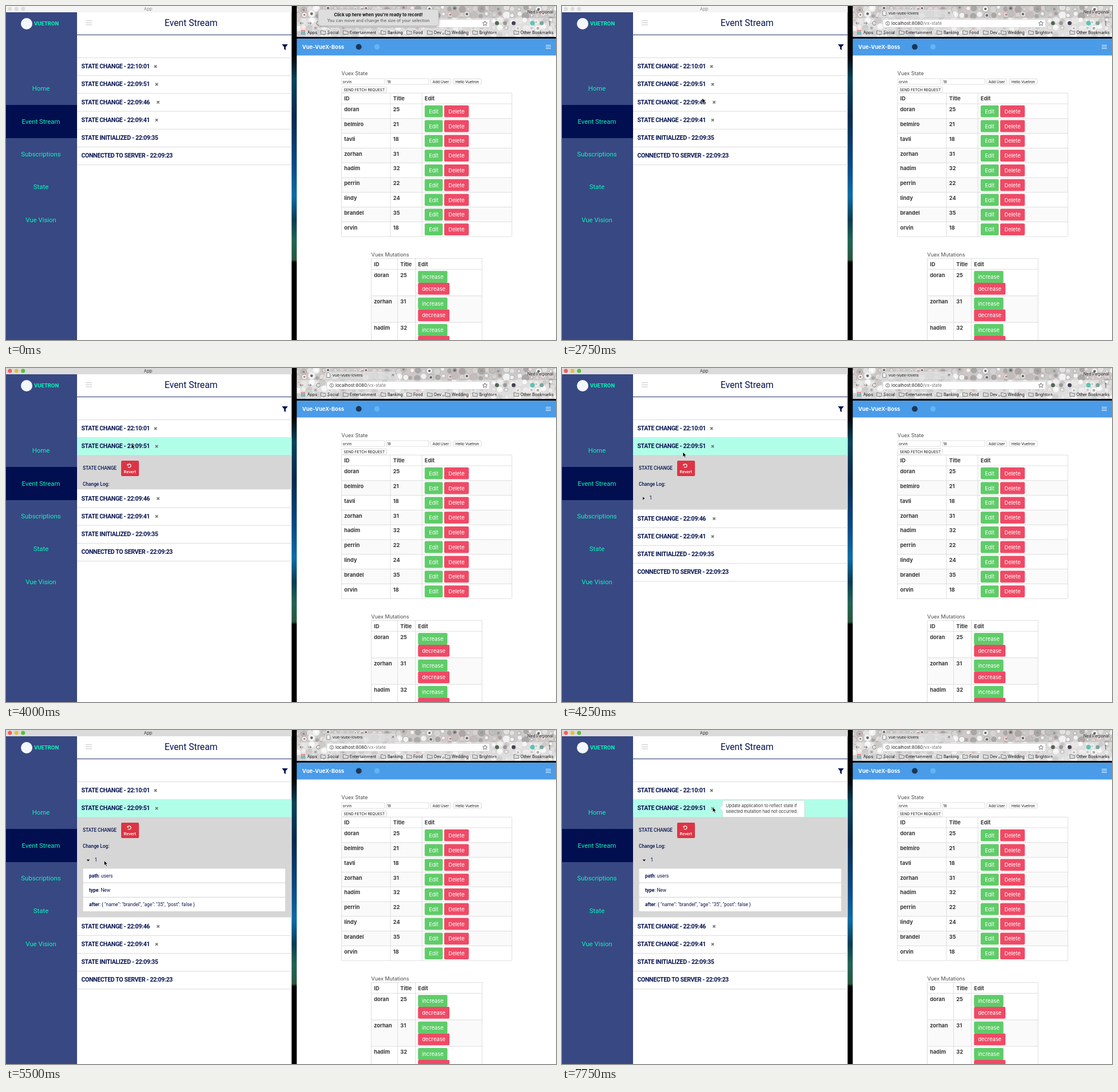
Recreate the animation shown at these times as an HTML page. Size 960 by 584 pixels, loop 8000 ms.

```html
<!DOCTYPE html>
<html lang="en">
<head>
<meta charset="utf-8">
<title>Event Stream</title>
<style>
  html, body { margin: 0; width: 100%; height: 100%; overflow: hidden; background: #fff; }
  #stage { display: block; width: 960px; height: 584px; }
  text { font-family: Inter, "Liberation Sans", sans-serif; white-space: pre; }
  .app text { font-family: Roboto, "Open Sans", sans-serif; }
  .app .event { letter-spacing: -.33px; }
</style>
</head>
<body>
<svg id="stage" viewBox="0 0 960 584"></svg>
<script>
const NAVY = '#06134f', TEAL = '#0cf5b8', GREEN = '#5fcc69', RED = '#ef4a66', LINE = '#dbdbdb';
const LOOP = 8000, STEP = 250;
const APP_WIDTH = 498.5;
const stage = document.getElementById('stage');

const box = (x, y, w, h, fill, extra = '') =>
  `<rect x="${x}" y="${y}" width="${w}" height="${h}" fill="${fill}" ${extra}/>`;
const dot = (x, y, r, fill, extra = '') =>
  `<circle cx="${x}" cy="${y}" r="${r}" fill="${fill}" ${extra}/>`;
const path = (d, fill, extra = '') => `<path d="${d}" fill="${fill}" ${extra}/>`;
const stroke = (d, color, width = 1) => path(d, 'none', `stroke="${color}" stroke-width="${width}"`);
// y is the middle of the capital letters
const text = (s, x, y, size, fill, weight = 400, extra = '') =>
  `<text x="${x}" y="${y + size * .36}" font-size="${size}" fill="${fill}" font-weight="${weight}" ${extra}>${s}</text>`;
const centered = (s, x, y, size, fill, weight) => text(s, x, y, size, fill, weight, 'text-anchor="middle"');
const burger = (x, y, w, gap, color) =>
  stroke([-1, 0, 1].map(i => `M${x} ${y + i * gap}h${w}`).join(''), color, 1.2);
const cross = (x, y, r, color, width) =>
  stroke(`M${x - r} ${y - r}l${2 * r} ${2 * r}m0 ${-2 * r}l${-2 * r} ${2 * r}`, color, width);

function sidebar() {
  const items = ['Home', 'Event Stream', 'Subscriptions', 'State', 'Vue Vision'];
  return box(0, 11, 124, 573, '#384883') + box(0, 173, 124, 58, '#010f50') +
    dot(36, 31, 10, '#f4f7fb') + text('VUETRON', 49, 31, 9.5, TEAL, 700) +
    items.map((s, i) => centered(s, 61, 144.3 + i * 57.3, 11.4, TEAL)).join('');
}

function eventRow(label, i, crossX) {
  const top = 90.5 + i * 31.2;
  return text(label, 131.5, top + 15, 10.5, NAVY, 600, 'class="event"') +
    (crossX ? cross(crossX, top + 15.3, 2.1, '#777', 1.7) : '') +
    stroke(`M124 ${top + 31.2}H${APP_WIDTH}`, LINE);
}

function detailPanel() {
  const entries = [['path', 'users'], ['type', 'New'],
    ['after', '{ "name": "brandel", "age": "35", "post": false }']];
  const list = entries.map(([key, value], i) =>
    box(134.5, 242.3 + i * 25.2, 353, 24.4, '#fff') +
    text(`<tspan font-weight="700">${key}</tspan>: ${value}`, 145, 254.6 + i * 25.2, 8.4, NAVY)).join('');
  return `<svg id="panel" x="124" y="152.3" width="${APP_WIDTH - 124}" height="0">
    ${box(124, 152, 375, 180, '#d6d6d6')}
    ${text('STATE CHANGE', 134, 175, 8.4, NAVY, 500, 'letter-spacing="-.1"')}
    ${box(201, 162, 31, 27, '#dc3545', 'rx="2"')}
    ${stroke('M212.6 169.2a3 3 0 1 1 .3 3.8', '#fff', 1.2)}
    ${path('M211.4 167.4v3.2h3.2z', '#fff')}
    ${centered('Revert', 216.3, 181.3, 7.4, '#fff', 500)}
    ${text('Change Log:', 134, 203.3, 8.3, NAVY, 500)}
    <g id="closed">${path('M141 225.6l3.4 2.4-3.4 2.4z', '#111')}${text('1', 152.6, 227, 8.6, NAVY)}</g>
    <g id="opened">${path('M140.6 226.6h5.6l-2.8 3z', '#111')}${text('1', 154.6, 227, 8.6, NAVY)}</g>
    <svg id="list" x="134" y="242" width="354" height="0">${box(134, 242, 354, 75.5, '#c6c6c6')}${list}</svg>
  </svg>`;
}

function appWindow() {
  const lights = ['#fc5b57', '#e5bf3c', '#57c038'];
  const titleBar = (id, fill, color, dots) => `<g id="${id}">${box(0, 0, APP_WIDTH, 11, fill)}
    ${dots.map((c, i) => dot(6.8 + i * 11.5, 5, 3.5, c)).join('')}${centered('App', 248, 5.3, 7.5, color)}</g>`;
  return `<g class="app">${box(0, 0, APP_WIDTH, 584, '#fff')}${sidebar()}
    ${burger(139, 29.3, 11, 3.6, '#cfcfcf')}${centered('Event Stream', 323, 29.5, 15.7, NAVY)}
    ${stroke(`M124 50.5H${APP_WIDTH}`, '#28356f')}${stroke(`M124 90.5H${APP_WIDTH}`, LINE)}
    ${path('M481.6 67h10.4l-3.8 4.8v5.4l-2.8-2v-3.4z', NAVY)}
    ${eventRow('STATE CHANGE - 22:10:01', 0, 261)}
    ${box(124, 121.7, APP_WIDTH - 124, 30.8, '#b1fee8', 'id="highlight"')}
    ${eventRow('STATE CHANGE - 22:09:51', 1, 263)}
    ${detailPanel()}
    <g id="below">${eventRow('STATE CHANGE - 22:09:46', 2, 265.5)}${eventRow('STATE CHANGE - 22:09:41', 3, 263)}
    ${eventRow('STATE INITIALIZED - 22:09:35', 4)}${eventRow('CONNECTED TO SERVER - 22:09:23', 5)}</g></g>
    ${titleBar('inactive', '#f5f5f5', '#888', Array(3).fill('#dcdcdc'))}
    ${titleBar('active', '#dcdbdc', '#333', lights)}`;
}

function themePattern() {
  let seed = 7;
  const random = () => (seed = seed * 16807 % 2147483647) / 2147483647;
  const pick = list => list[Math.floor(random() * list.length)];
  let out = box(507, 0, 453, 57, '#cbc9c8');
  for (let x = 507; x < 966; x += 11) for (let y = 2; y < 58; y += 11) {
    const cx = (x + random() * 5).toFixed(1), cy = (y + random() * 5).toFixed(1), r = 3 + random() * 3.5;
    out += dot(cx, cy, r.toFixed(1), pick(['#f2f2f2', '#e3e1e0', '#d6d4d3', '#c0bebd', '#aaa8a7']),
      `stroke="${pick(['#b5b5b5', '#eee', '#c9a5a2', '#999'])}" stroke-width=".7"`);
    if (random() < .3) out += dot(cx, cy, (r * .4).toFixed(1), pick(['#666', '#b08080', '#999', '#fff']));
  }
  return out;
}

function browserBar() {
  const bookmarks = [['Social', 561], ['Entertainment', 600], ['Banking', 666], ['Food', 711],
    ['Dev', 747], ['Wedding', 778], ['Brightorn', 826], ['Other Bookmarks', 898]];
  const folder = x => path(`M${x} 43h3l1 1.2h4.5v5.3h-8.5z`, '#ddd', 'stroke="#666" stroke-width=".8"');
  const grid = [0, 1, 2].map(i => ['#e2574c', '#4a9', '#48c'].map((c, j) =>
    box(515 + i * 2.6, 42.5 + j * 2.6, 1.9, 1.9, c)).join('')).join('');
  return themePattern() + path('M551 21l7-15.5h121l7 15.5z', '#e0e0e0', 'opacity=".8" stroke="#aaa" stroke-width=".6"') +
    box(507, 21, 453, 18, '#fff', 'opacity=".4"') + box(507, 39, 453, 15, '#f0f0f0', 'opacity=".55"') +
    path('M560 8.5h3.5l2 2v6h-5.5z', '#fff', 'stroke="#666" stroke-width=".7"') +
    text('vue-vuex-lovers', 570, 12.3, 6.8, '#222') + cross(675.5, 12, 1.8, '#555', .9) +
    text('Ned Personal', 910, 10, 7.1, '#222') +
    stroke('M519 30h-6m2.5-2.5l-2.5 2.5 2.5 2.5M527 30h6m-2.5-2.5l2.5 2.5-2.5 2.5M548 28.5a3.3 3.3 0 1 0 .3 2.5', '#777') +
    box(560, 23.5, 284, 14, '#fff', 'rx="2" stroke="#c4c4c4" stroke-width=".6"') +
    dot(568.5, 30.5, 3.2, 'none', 'stroke="#555" stroke-width=".8"') + stroke('M568.5 30v2.3m0-4v1', '#555', .9) +
    text('localhost:8080<tspan fill="#777">/vx-state</tspan>', 575, 30.5, 7.8, '#222') +
    path('M836 26.3l1.2 2.7 2.9.3-2.2 1.9.7 2.9-2.6-1.5-2.6 1.5.7-2.9-2.2-1.9 2.9-.3z', 'none', 'stroke="#555" stroke-width=".8"') +
    dot(857, 30, 3.5, '#565') + dot(871, 30, 3.5, '#999') + dot(886, 30, 3.5, '#445') +
    dot(919, 30, 4, '#5cc3b4') + dot(935, 30, 3.5, '#7ba39b') +
    [27, 30, 33].map(y => dot(949, y, 1, '#555')).join('') +
    grid + text('Apps', 526, 46.3, 7, '#111') +
    bookmarks.map(([s, x]) => folder(x - 11.5) + text(s, x, 46.3, 7, '#111')).join('');
}

const button = (label, x, y, w, fill) =>
  box(x, y, w, 20.8, fill, 'rx="2"') + centered(label, x + w / 2, y + 10.6, 9.3, '#fff');
const smallButton = (label, x, y, w) =>
  box(x, y, w, 9.5, '#fff', 'rx="1.5" stroke="#ccc" stroke-width=".7"') + centered(label, x + w / 2, y + 4.9, 6.4, '#111');
const input = (value, x) =>
  box(x, 127, 74.5, 10, '#fff', 'stroke="#d8d8d8" stroke-width=".8"') + text(value, x + 1.7, 132.2, 6.6, '#222');

function table(columns, right, top, rowHeight, rows, buttons) {
  const first = top + 18.8, bottom = first + rows.length * rowHeight;
  const cell = (s, col, y) => text(s, columns[col] + 4.8, y, 9.2, '#363636', 700);
  let out = ['ID', 'Title', 'Edit'].map((s, i) => cell(s, i, top + 9.7)).join('');
  let lines = `M${columns[0]} ${top}H${right}`;
  rows.forEach(([name, age], i) => {
    const y = first + i * rowHeight;
    if (i % 2) out += box(columns[0], y, right - columns[0], rowHeight, '#fafafa');
    out += cell(name, 0, y + 9.8) + cell(age, 1, y + 9.8) + buttons(y);
    lines += `M${columns[0]} ${y}H${right}`;
  });
  lines += `M${columns[0]} ${bottom}H${right}` + [...columns, right].map(x => `M${x} ${top}V${bottom}`).join('');
  return out + stroke(lines, LINE, .9);
}

function webPage() {
  const users = [['doran', 25], ['belmiro', 21], ['tavli', 18], ['zorhan', 31], ['hadim', 32],
    ['perrin', 22], ['lindy', 24], ['brandel', 35], ['orvin', 18]];
  return box(507, 54, 453, 3, '#080808') + box(507, 86, 453, 498, '#fff') + box(507, 57, 453, 29.5, '#4a9be8') +
    text('Vue-VueX-Boss', 517, 72, 9.3, '#fff', 700) +
    dot(615.7, 71.5, 5, '#1b3656') + dot(647.5, 71.5, 4.8, '#62b5f2') + burger(942, 71.5, 9, 2.8, '#d3e7fa') +
    text('Vuex State', 585.5, 118, 9, '#4a4a4a') + input('orvin', 586) + input('18', 663.5) +
    smallButton('Add User', 741, 127.5, 35.5) + smallButton('Hello Vuetron', 780.5, 127.5, 49) +
    smallButton('SEND FETCH REQUEST', 586, 141.5, 78.5) +
    table([585.5, 671, 726], 883, 152.2, 25.8, users, y =>
      button('Edit', 730.8, y + 2.8, 31.5, GREEN) + button('Delete', 764.8, y + 2.8, 43, RED)) +
    text('Vuex Mutations', 637.5, 434.8, 9, '#4a4a4a') +
    table([637.5, 683.5, 714.5], 831, 441.6, 46.4, [users[0], users[3], users[4]], y =>
      button('increase', 719.2, y + 2.9, 51.3, GREEN) + button('decrease', 719.2, y + 23.6, 54.8, RED));
}

const popup = `<g id="popup">${path('M643 6.5l7-6.5 7 6.5z', '#e2e2e2')}
  ${box(545, 6, 210, 28.5, '#dedede', 'rx="4" stroke="#bbb" stroke-width=".7" filter="url(#shadow)"')}
  ${centered("Click up here when you're ready to record!", 650, 15.5, 7.5, '#111', 700)}
  ${centered('You can move and change the size of your selection', 650, 25.5, 7.25, '#555')}</g>`;

const tooltip = `<g id="tooltip">
  ${path('M282 123h139.5a2 2 0 0 1 2 2v25.5a2 2 0 0 1-2 2h-139.5a2 2 0 0 1-2-2v-9l-5-5 5-5v-6.5a2 2 0 0 1 2-2z', '#fff', 'stroke="#c8d4d0" stroke-width=".8"')}
  ${text('Update application to reflect state if', 286, 132.2, 7.35, '#333')}
  ${text('selected mutation had not occurred.', 286, 142.6, 7.35, '#333')}</g>`;

const skyStops = [[0, '#000'], [.15, '#020509'], [.22, '#0a4259'], [.33, '#08284c'], [.48, '#0a4a88'],
  [.57, '#0c6ca6'], [.64, '#0b3a52'], [.7, '#1f6353'], [.76, '#28573e'], [.768, '#000']];

stage.innerHTML = `<defs>
    <linearGradient id="sky" gradientUnits="userSpaceOnUse" x1="0" x2="0" y1="0" y2="584">${skyStops.map(([o, c]) => `<stop offset="${o}" stop-color="${c}"/>`).join('')}</linearGradient>
    <filter id="shadow"><feDropShadow dx="0" dy="2" stdDeviation="2" flood-opacity=".35"/></filter>
  </defs>
  ${browserBar()}${webPage()}${box(498, 0, 9.5, 584, 'url(#sky)')}${appWindow()}${popup}${tooltip}
  ${path('M0 0v8.6l2-1.8 1.5 3.3 1.6-.7-1.5-3.2h2.7z', '#000', 'id="cursor" stroke="#fff" stroke-width=".7"')}`;

const part = Object.fromEntries([...stage.querySelectorAll('[id]')].map(el => [el.id, el]));
const show = (id, on) => part[id].setAttribute('visibility', on ? 'inherit' : 'hidden');

// [time, x, y]
const cursorPath = [[750, 646, 2], [1000, 508, 84], [1250, 387.5, 139], [1500, 387.5, 139], [2000, 320, 146],
  [2750, 244.5, 161], [3250, 219, 132.5], [4000, 219, 132.5], [4250, 211, 147], [5000, 139, 226.5],
  [5250, 139, 226.5], [6250, 268, 233.5], [6500, 268, 233.5], [7250, 263, 135], [8000, 263, 135]];

function cursorAt(t) {
  const i = cursorPath.findIndex(([time]) => time > t);
  const [t0, x0, y0] = cursorPath[i - 1], [t1, x1, y1] = cursorPath[i];
  const k = (t - t0) / (t1 - t0);
  return [x0 + (x1 - x0) * k, y0 + (y1 - y0) * k];
}

function panelHeight(t) {
  if (t < 4000) return 0;
  if (t < 4250) return 60;
  if (t < 5250) return 95.2;
  return t < 5500 ? 162 : 175.2;
}

// A viewBox equal to the frame clips the contents without scaling them
function resize(svg, height) {
  const [x, y, width] = ['x', 'y', 'width'].map(name => svg.getAttribute(name));
  svg.setAttribute('height', height);
  svg.setAttribute('viewBox', `${x} ${y} ${width} ${height}`);
}

function draw(t) {
  const height = panelHeight(t), open = t >= 5250;
  show('popup', t < 250);
  show('active', t >= 3250);
  show('highlight', height > 0);
  show('panel', height > 0);
  show('closed', !open);
  show('opened', open);
  show('list', open);
  show('tooltip', t >= 7500);
  show('cursor', t >= 750);
  resize(part.panel, height);
  resize(part.list, Math.max(0, height - 100.2));
  part.below.setAttribute('transform', `translate(0 ${height})`);
  if (t >= 750) part.cursor.setAttribute('transform', `translate(${cursorAt(t)})`);
}

const start = performance.now();
function tick() {
  const t = (performance.now() - start) % LOOP;
  draw(Math.floor(t / STEP) * STEP);
  requestAnimationFrame(tick);
}
tick();
</script>
</body>
</html>
```
